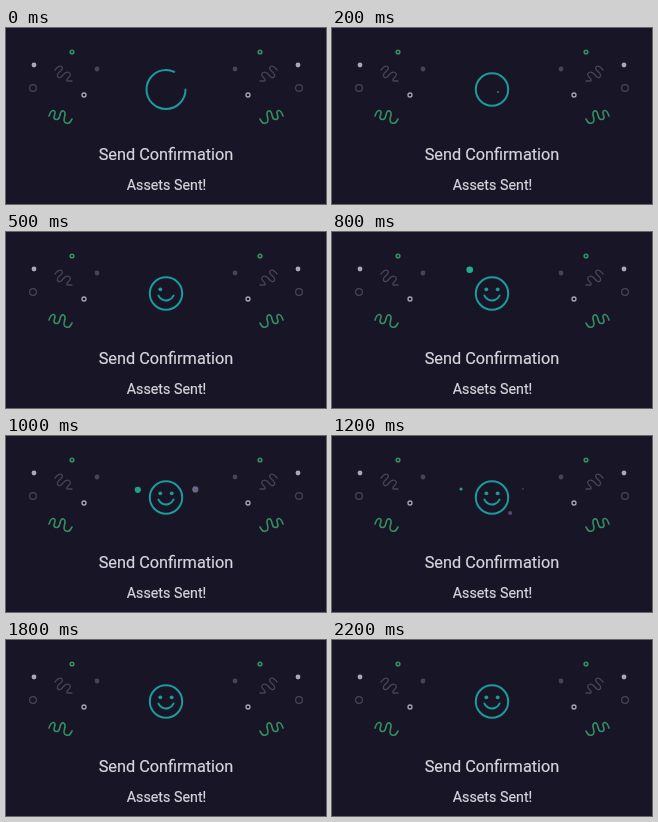
Write an HTML page with a canvas that moves like this. It is 320 by 176 pixels and loops after 2.3 s.

```html
<!DOCTYPE html>
<html lang="en">
<head>
<meta charset="utf-8">
<title>Send Confirmation</title>
<style>
  html, body { margin: 0; width: 100%; height: 100%; overflow: hidden; background: #181626; }
  canvas, svg { position: absolute; left: 0; top: 0; width: 320px; height: 176px; display: block; }
  text { font-family: Roboto, Arial, sans-serif; text-anchor: middle; fill: #d6d6dd; stroke: #d6d6dd; stroke-width: 0.2px; }
</style>
</head>
<body>
<canvas id="stage"></canvas>
<svg viewBox="0 0 320 176">
  <text x="160" y="131.8" font-size="16.3">Send Confirmation</text>
  <text x="160.5" y="162" font-size="14.3">Assets Sent!</text>
</svg>
<script>
const LOOP = 2300, STEP = 100, POP = 400;
const CX = 160, CY = 61.5;
const TEAL = '#1c9a9c', GREEN = '#338f63', PURPLE = '#47435b', WHITE = '#a9a8b5';

const canvas = document.getElementById('stage');
const ctx = canvas.getContext('2d');
const ratio = window.devicePixelRatio || 1;
canvas.width = 320 * ratio;
canvas.height = 176 * ratio;

const clamp = v => Math.max(0, Math.min(1, v));
const lerp = (a, b, p) => a + (b - a) * p;
const span = (t, from, to) => clamp((t - from) / (to - from));
const easeOut = p => 1 - (1 - p) ** 4;

// start time, peak radius, final offset from the face centre
const pops = [
  { start: 600, r: 3.3, x: -23, y: -24.5, color: '#25ad8a' },
  { start: 860, r: 3.5, x: -31, y: -8.5, color: '#1f9f8e' },
  { start: 828, r: 3.2, x: 31, y: -8.5, color: '#6a6580' },
  { start: 1148, r: 5, x: 25.5, y: 21.8, color: '#5a4670' },
  { start: 1400, r: 3.7, x: -24.8, y: 24.3, color: '#a9c6c9' },
  { start: 1300, r: 3.2, x: 23, y: -23.5, color: '#755048' }
];

const greenRibbon = [[43, 88], [45, 82], [50, 83], [47, 91], [53, 92], [55, 82], [60, 84], [57, 94], [63, 96], [66, 91]];
const purpleRibbon = [[49, 42], [53, 37], [58, 40], [50, 47], [54, 51], [60, 43], [66, 46], [59, 53], [66, 53]];

function dot(x, y, r, color) {
  ctx.fillStyle = color;
  ctx.beginPath();
  ctx.arc(x, y, r, 0, Math.PI * 2);
  ctx.fill();
}

function arc(x, y, r, color, width, from = 0, to = Math.PI * 2) {
  ctx.strokeStyle = color;
  ctx.lineWidth = width;
  ctx.beginPath();
  ctx.arc(x, y, r, from, to);
  ctx.stroke();
}

// Smooth curve guided by a few control points
function ribbon(points, color, width) {
  ctx.strokeStyle = color;
  ctx.lineWidth = width;
  ctx.beginPath();
  ctx.moveTo(...points[0]);
  for (let i = 1; i < points.length - 1; i++) {
    const [x, y] = points[i], [nx, ny] = points[i + 1];
    ctx.quadraticCurveTo(x, y, (x + nx) / 2, (y + ny) / 2);
  }
  ctx.lineTo(...points[points.length - 1]);
  ctx.stroke();
}

function confetti() {
  arc(66, 24, 1.8, GREEN, 1.6);
  dot(28, 37, 2.4, WHITE);
  arc(27, 60, 3.4, PURPLE, 1.2);
  dot(91, 41, 2.4, PURPLE);
  arc(78, 67, 2, WHITE, 1.3);
  ribbon(purpleRibbon, PURPLE, 1.3);
  ribbon(greenRibbon, GREEN, 1.6);
}

function mirrored(draw) {
  draw();
  ctx.save();
  ctx.translate(320, 0);
  ctx.scale(-1, 1);
  draw();
  ctx.restore();
}

function face(t) {
  const closed = span(t, 0, 100);
  const r = lerp(19.5, 16.2, span(t, 0, 200));
  arc(CX, CY, r, TEAL, 2, 0, lerp(295, 360, closed) * Math.PI / 180);

  if (t < 200) return;
  if (t < 300) {
    dot(166, 64, 0.9, GREEN);
    return;
  }
  const grow = span(t, 200, 500);
  dot(154.3, 57.3, 1.9 * grow, TEAL);
  const half = 1.12 * grow;
  arc(CX, 60, 8.4, TEAL, 2, Math.PI / 2 - half, Math.PI / 2 + half);
  if (t >= 600) dot(165.7, 57.3, 1.9, TEAL);
}

function burst(t) {
  for (const d of pops) {
    const p = (t - d.start) / POP;
    if (p <= 0 || p >= 1) continue;
    const k = lerp(0.49, 1, easeOut(p));
    dot(CX + d.x * k, CY + d.y * k, d.r * Math.sin(Math.PI * p), d.color);
  }
}

function render(now) {
  const t = Math.floor((now % LOOP) / STEP) * STEP;
  ctx.setTransform(ratio, 0, 0, ratio, 0, 0);
  ctx.fillStyle = '#181626';
  ctx.fillRect(0, 0, 320, 176);
  ctx.lineCap = 'round';
  ctx.lineJoin = 'round';
  mirrored(confetti);
  face(t);
  burst(t);
}

const begin = performance.now();
function tick() {
  render(performance.now() - begin);
  requestAnimationFrame(tick);
}
tick();
</script>
</body>
</html>
```
